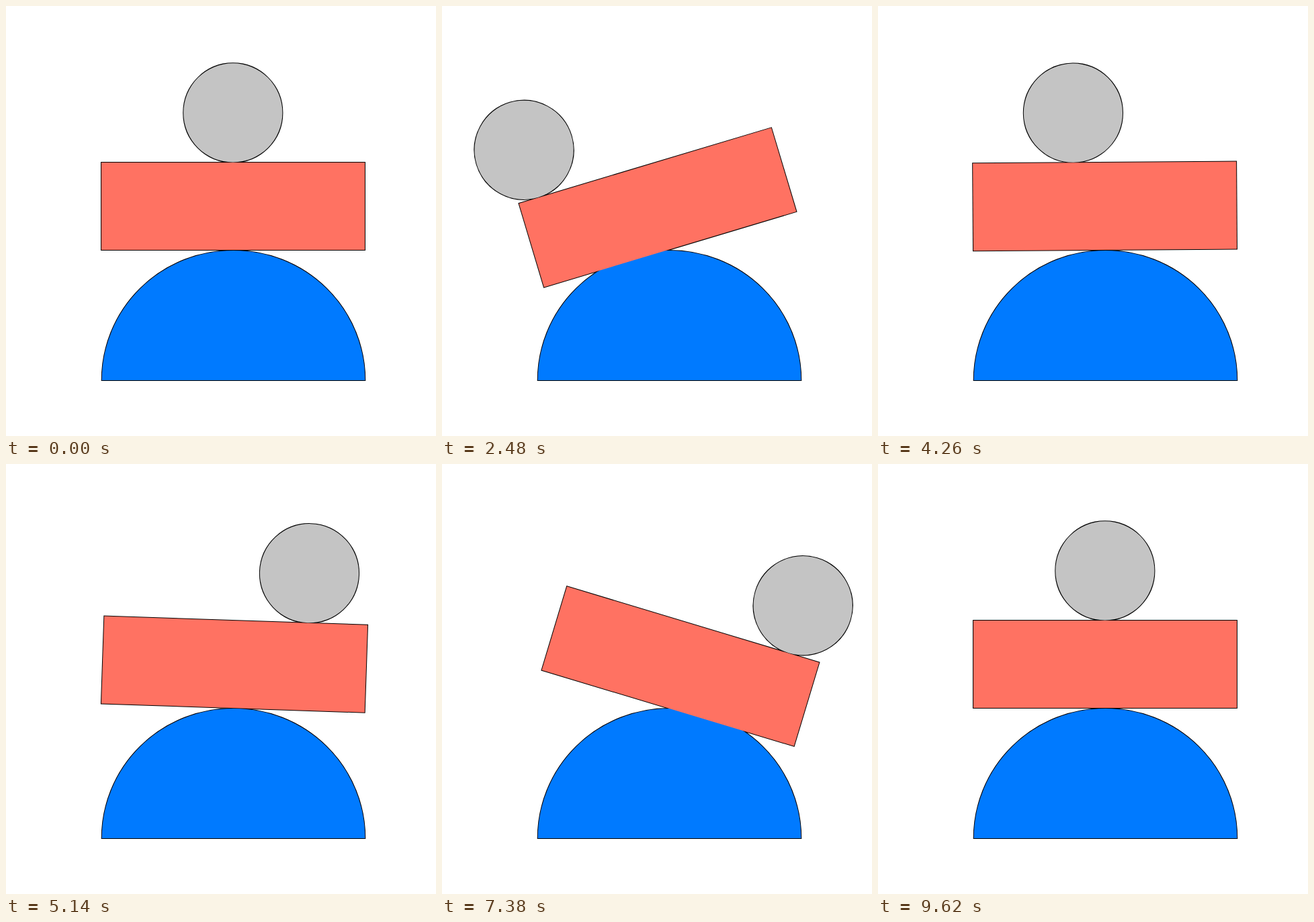
Animation, 640 px wide and 640 px high, one loop 9640 ms. Source, as an HTML page:

```html
<!DOCTYPE html>
<html lang="en">
<head>
<meta charset="utf-8">
<title>Balance</title>
<style>
  html, body { margin: 0; width: 100%; height: 100%; overflow: hidden; background: #fff; }
  svg { display: block; width: 100%; height: 100%; }
</style>
</head>
<body>
<svg viewBox="0 0 640 640">
  <defs>
    <g id="shapes">
      <path d="M142.7 557A195.8 193 0 0 1 534.3 557Z" fill="#007aff"/>
      <g id="board">
        <rect x="142" y="233" width="392" height="130" fill="#ff7262"/>
        <circle id="ball" cx="337.8" cy="158.9" r="73.6" fill="#c4c4c4"/>
      </g>
    </g>
  </defs>
  <!-- outlines lie below every fill -->
  <use href="#shapes" stroke="#000" stroke-width="2"/>
  <use href="#shapes"/>
</svg>
<script>
  const LOOP = 9640, STEP = 20;
  const board = document.getElementById('board');
  const ball = document.getElementById('ball');

  // [time in ms, value]
  const tilt = [[0, 0], [2370, -16.8], [4467, 0], [7520, 16.85], [LOOP, 0]];
  const roll = [
    [0, 0], [980, -85], [1460, -144.8], [1960, -162], [2380, -166],
    [2940, -160.5], [3440, -144.7], [3920, -112], [4260, -46], [4900, 92],
    [6020, 138.4], [6860, 148.6], [7250, 149.6], [7840, 134.7], [8820, 21], [LOOP, 0]
  ];

  const segment = (keys, t) => {
    let i = 0;
    while (i < keys.length - 2 && t >= keys[i + 1][0]) i++;
    return i;
  };

  function sineEase(keys, t) {
    const i = segment(keys, t);
    const [t0, a] = keys[i], [t1, b] = keys[i + 1];
    return a + (b - a) * (1 - Math.cos(Math.PI * (t - t0) / (t1 - t0))) / 2;
  }

  const secant = (keys, i) =>
    (keys[i + 1][1] - keys[i][1]) / (keys[i + 1][0] - keys[i][0]);

  // Flat at the ends and turning points, harmonic mean elsewhere
  function slope(keys, i) {
    if (i === 0 || i === keys.length - 1) return 0;
    const p = secant(keys, i - 1), q = secant(keys, i);
    return p * q > 0 ? 2 * p * q / (p + q) : 0;
  }

  function smooth(keys, t) {
    const i = segment(keys, t);
    const [t0, a] = keys[i], [t1, b] = keys[i + 1];
    const h = t1 - t0, u = (t - t0) / h, v = 1 - u;
    return a * v * v * (1 + 2 * u) + b * u * u * (1 + 2 * v)
      + h * u * v * (slope(keys, i) * v - slope(keys, i + 1) * u);
  }

  function draw(t) {
    board.setAttribute('transform', `rotate(${sineEase(tilt, t).toFixed(3)} 336 357)`);
    ball.setAttribute('cx', (337.8 + smooth(roll, t)).toFixed(2));
  }

  const start = performance.now();
  function tick() {
    const t = (performance.now() - start) % LOOP;
    draw(Math.floor(t / STEP) * STEP);
    requestAnimationFrame(tick);
  }
  tick();
</script>
</body>
</html>
```
